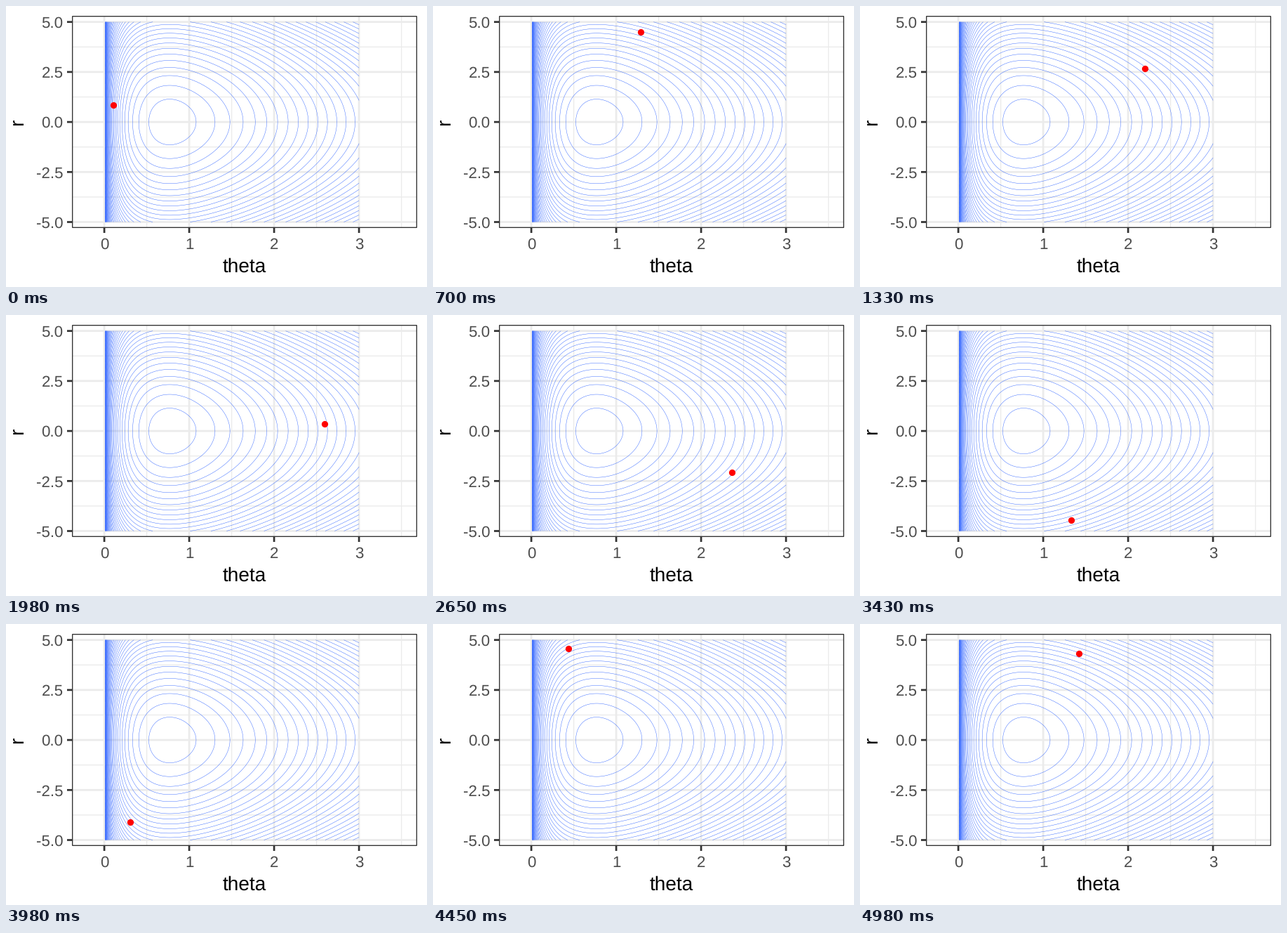
A matplotlib script for the animation above (5 s loop, 600x400 px).

```python
import matplotlib.pyplot as plt
import numpy as np
from matplotlib.animation import FuncAnimation
from matplotlib.patches import Rectangle

W, H, DPI = 600, 400, 100
PT = 72 / DPI                        # points per pixel
LEFT, RIGHT, TOP, BOTTOM = 94, 586, 14, 316
FRAMES, INTERVAL = 200, 25
STEP = 0.01
LEVEL_GAP = 1.0212

plt.rcParams["font.family"] = "Liberation Sans"
plt.rcParams["path.snap"] = False
plt.rcParams["text.hinting"] = "none"


def px(theta):
    return 140.1 + 121 * theta


def py(r):
    return 165.1 - 28.48 * r


def potential(theta):
    return 13 * theta - 10 * np.log(theta)


def slope(theta):
    return 13 - 10 / theta


def leapfrog(theta, r, count):
    """Positions after each of `count` leapfrog steps."""
    path = []
    for _ in range(count):
        r -= STEP / 2 * slope(theta)
        theta += STEP * r
        r -= STEP / 2 * slope(theta)
        path.append((px(theta), py(r)))
    return path


fig = plt.figure(figsize=(W / DPI, H / DPI), dpi=DPI, facecolor="white")
ax = fig.add_axes([0, 0, 1, 1])
ax.set_xlim(0, W)
ax.set_ylim(H, 0)
ax.axis("off")


def line(xs, ys, color, width, z):
    ax.plot(xs, ys, color=color, lw=width * PT, solid_capstyle="butt", zorder=z)


def vline(x, width):
    line([x, x], [TOP, BOTTOM], "#EBEBEB", width, 1)


def hline(y, width):
    line([LEFT, RIGHT], [y, y], "#EBEBEB", width, 1)


def label(x, y, text, size, color, **kw):
    ax.text(x, y, text, fontsize=size * PT, color=color, va="baseline", **kw)


# grid
for t in (0.5, 1.5, 2.5, 3.5):
    vline(px(t), 1.36)
for r in (-3.75, -1.25, 1.25, 3.75):
    hline(py(r), 1.36)
for t in range(4):
    vline(px(t), 2.72)
for r in (-5, -2.5, 0, 2.5, 5):
    hline(py(r), 2.72)

# energy contours
theta = np.linspace(0.01, 3, 300)
mom = np.linspace(-5, 5, 101)
energy = potential(theta)[None, :] + mom[:, None] ** 2 / 2
ax.contour(px(theta), py(mom), energy, levels=LEVEL_GAP * np.arange(13, 58),
           colors="#3366FF", linewidths=0.45 * PT, zorder=2)

# panel border, ticks and labels
ax.add_patch(Rectangle((LEFT + 0.68, TOP + 0.68), RIGHT - LEFT - 1.36,
                       BOTTOM - TOP - 1.36, fill=False, ec="#333333",
                       lw=1.36 * PT, joinstyle="miter", zorder=5))
for t in range(4):
    line([px(t)] * 2, [BOTTOM, BOTTOM + 7], "#333333", 2.72, 4)
    label(px(t), 346, str(t), 22.4, "#4D4D4D", ha="center")
for r in (-5, -2.5, 0, 2.5, 5):
    line([LEFT - 7, LEFT], [py(r)] * 2, "#333333", 2.72, 4)
    label(81.5, py(r) + 8, f"{r:.1f}", 22.4, "#4D4D4D", ha="right")
label((LEFT + RIGHT) / 2, 379, "theta", 28, "black", ha="center")
label(30, 165, "r", 28, "black", ha="right", rotation=90)
ax.texts[-1].set(ha="right", va="center")

path = leapfrog(0.1, 0.0, FRAMES)
dot, = ax.plot([], [], "o", color="red", ms=9.24 * PT, mew=0, zorder=3)


def update(i):
    x, y = path[i]
    dot.set_data([x], [y])
    return dot,


anim = FuncAnimation(fig, update, frames=FRAMES, interval=INTERVAL,
                     repeat=True, repeat_delay=0, blit=False)
plt.show()
```
